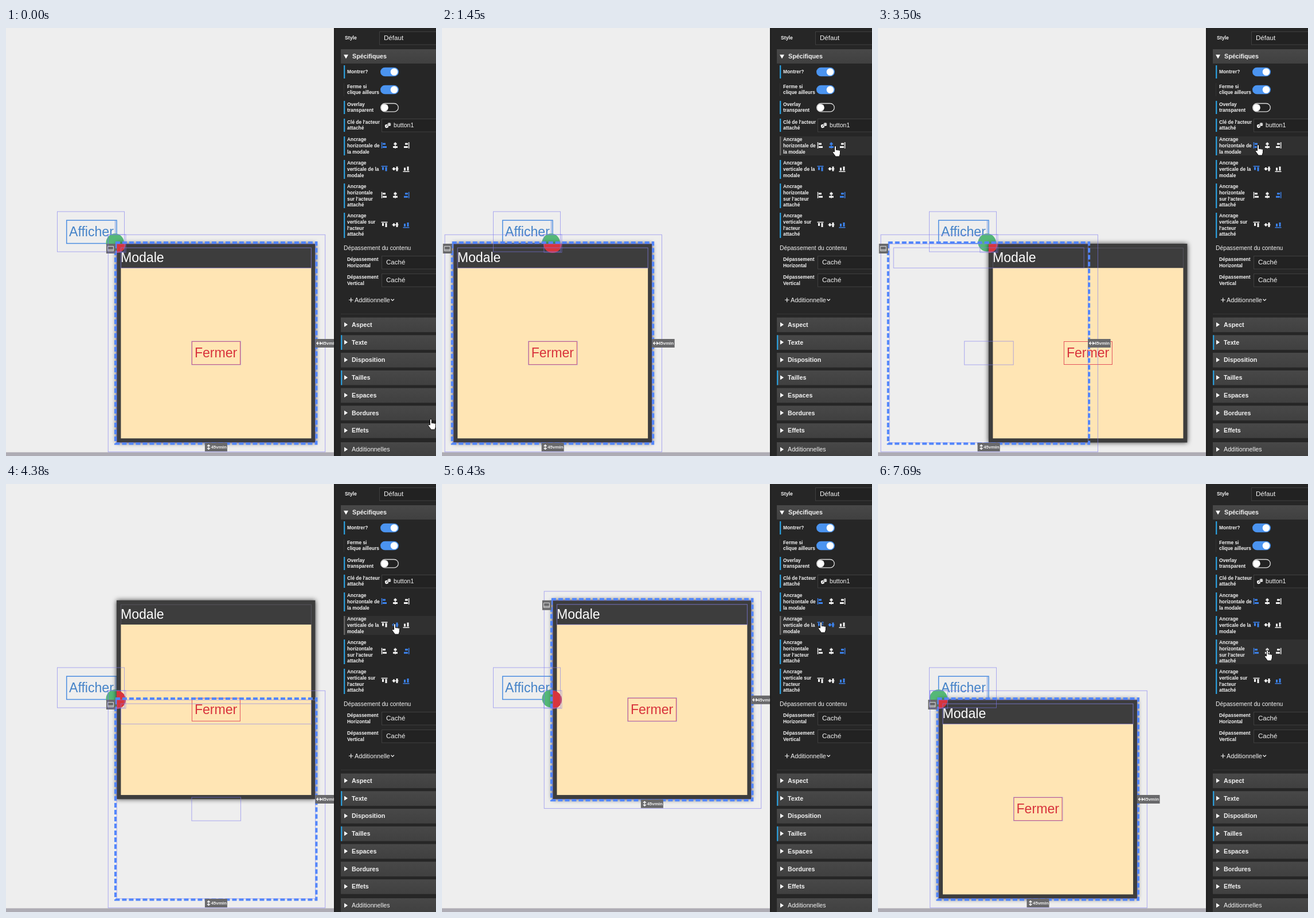
Write an HTML page that moves like this. It is 750 px wide and 746 px high and loops after 8 s.

```html
<!DOCTYPE html>
<html lang="fr">
<head>
<meta charset="utf-8">
<title>Ancrage de la modale</title>
<style>
  html, body { margin: 0; width: 100%; height: 100%; overflow: hidden; background: #eee; }
  svg { display: block; width: 100%; height: 100%; }
  text { font-family: "Liberation Sans", Arial, sans-serif; white-space: pre; }
  .thin { fill: none; stroke: #7c78ee; stroke-opacity: .6; }
  #box { filter: drop-shadow(0 0 4px rgba(0, 0, 0, .75)); }
</style>
</head>
<body>
<svg id="stage" viewBox="0 0 750 746">
  <defs>
    <linearGradient id="bar" x2="0" y2="1">
      <stop stop-color="#484848"/><stop offset="1" stop-color="#404040"/>
    </linearGradient>
    <clipPath id="inside"><rect id="insideRect" width="346.5" height="346.5"/></clipPath>
  </defs>
  <rect width="750" height="746" fill="#eee"/>
  <rect y="739.5" width="572" height="7" fill="#aeacb4"/>

  <rect x="105.7" y="335.2" width="87.3" height="40.3" fill="none" stroke="#4b8de0" stroke-width="1.5"/>
  <path d="M190.5 336V375" stroke="#7c9fe4"/>
  <text x="110" y="363" font-size="23.1" fill="#4583c8">Afficher</text>
  <circle id="green" cy="374" r="15.7" fill="#55b877"/>

  <g id="modal">
    <rect id="box" width="346.5" height="346.5" fill="#3d3d3d"/>
    <rect x="7.5" y="7.5" width="332" height="35" fill="none" stroke="#55545c"/>
    <rect x="7.5" y="42.3" width="332" height="297" fill="#ffe5b4"/>
    <text x="7" y="32" font-size="23.1" fill="#fff">Modale</text>
    <rect x="131.5" y="170.5" width="84" height="40" fill="none" stroke="#e4525b"/>
    <text x="136" y="198" font-size="23.1" fill="#d8333c">Fermer</text>
  </g>
  <g clip-path="url(#inside)"><circle id="red" cy="376" r="16" fill="#d7353d"/></g>

  <rect class="thin" x="89.5" y="320" width="117" height="70"/>
  <g id="overlay">
    <rect class="thin" x="-14.7" y="-15.7" width="378.5" height="378.5"/>
    <rect class="thin" x="7.5" y="7" width="332" height="35.3" stroke-opacity=".35"/>
    <rect class="thin" x="131" y="170" width="85.5" height="41"/>
    <rect class="thin" x=".3" y=".3" width="346.5" height="346.5"/>
    <rect x="-2" y="-2" width="350.5" height="350.5" fill="none" stroke="#5286fb" stroke-width="4" stroke-dasharray="8 4"/>
    <g fill="#69696b">
      <rect x="-18" y="0" width="16" height="17"/>
      <rect x="346.5" y="166" width="39.5" height="15"/>
      <rect x="154" y="347" width="39" height="15"/>
    </g>
    <path d="M-15.5 4.5h10v8h-10zM-15.5 10.5h10" fill="none" stroke="#ddd"/>
    <g fill="none" stroke="#fff" stroke-width="1.2">
      <path d="M349.5 173.500h7M351.500 171l-2.500 2.500l2.500 2.500M354.500 171l2.500 2.500l-2.500 2.500"/>
      <path d="M160.500 350.500v8M158 353l2.500-2.500l2.500 2.500M158 356l2.500 2.500l2.500-2.500"/>
    </g>
    <g font-size="8" font-weight="bold" fill="#eee">
      <text x="357" y="176.300">45vmin</text><text x="164.500" y="357.300">45vmin</text>
    </g>
  </g>
  <rect class="thin" id="pin" y="360" width="31" height="31"/>

  <g id="panel"></g>
  <path id="hand" fill="#fff" stroke="#111" stroke-linejoin="round"
    d="M3.500 11V2a1.500 1.500 0 0 1 3 0V8a1.200 1.200 0 0 1 2.400.300a1.200 1.200 0 0 1 2.400.500a1.100 1.100 0 0 1 2.200.700V14L12 19H5.500L.800 12.500a1.400 1.400 0 0 1 2.200-1.700Z"/>
</svg>
<script>
const LOOP = 8000, HALF = 173.25;
const BLUE = '#2b9cd8', ACTIVE = '#3c83ee';
const $ = id => document.getElementById(id);
const panel = $('panel');

function add(tag, attrs, content = '') {
  const el = document.createElementNS('http://www.w3.org/2000/svg', tag);
  for (const key in attrs) el.setAttribute(key, attrs[key]);
  el.textContent = content;
  panel.append(el);
  return el;
}
const rect = (x, y, width, height, fill, more) => add('rect', { x, y, width, height, fill, ...more });
const path = (d, more) => add('path', { d, ...more });
const label = (x, middle, size, content, bold) => add('text', {
  x, y: middle + size * .35, 'font-size': size, fill: '#f4f4f4', 'font-weight': bold ? 700 : 400
}, content);
const mark = (y, h, x = 589) => rect(x, y, 2.3, h, BLUE);

function field(x, y, value, textX, size = 11.6) {
  rect(x + .5, y + .5, 110, 22.500, '#222', { stroke: '#404040' });
  label(textX, y + 11.2, size, value);
}
function caption(lines, first) {
  lines.split('|').forEach((line, i) => label(595, first + i * 10.6, 8.4, line, true));
}
function section(y, h, name, open, bold = true) {
  rect(584, y, 166, h, 'url(#bar)');
  const m = y + 12.5;
  path(open ? `M589 ${m - 3}h8l-4 7z` : `M590 ${m - 4}v8l6-4z`, { fill: '#fff' });
  label(open ? 604 : 603, m, 10.7, name, bold);
}
function toggle(y, on) {
  rect(653.7, y - 7.2, 30.6, 14.4, on ? '#4b94f0' : '#222', { rx: 7.2, stroke: on ? '#4b94f0' : '#ddd', 'stroke-width': 1.3 });
  add('circle', { cx: on ? 677 : 660.5, cy: y, r: 6.3, fill: '#fff' });
}
// Alignment glyph: a guide line with two blocks; side 0, 1, 2 = start, middle, end.
function alignIcon(x, y, side, vertical) {
  const guide = [-5.2, -.7, 4][side];
  const blocks = [[-3, -3], [-2.5, -4], [-2, -4]][side];
  const d = `M${guide} -5.5h1.400v11h-1.400z`
    + `M${blocks[0]} -4h5v3h-5zM${blocks[1]} 1.500h${side === 1 ? 8 : 7}v3h-${side === 1 ? 8 : 7}z`;
  return path(d, { transform: `translate(${x} ${y})` + (vertical ? ' matrix(0 1 1 0 0 0)' : '') });
}

rect(572, 0, 178, 746, '#262626');
rect(572, 0, 2, 746, '#1d1d1d');
label(591, 17, 8.7, 'Style', true);
field(651, 6, 'Défaut', 659);
section(37, 25, 'Spécifiques', true);

mark(65, 23); caption('Montrer?', 76); toggle(76.5, true);
rect(589, 96, 1, 23, '#333'); caption('Ferme si|clique ailleurs', 101.7); toggle(107.5, true);
mark(127, 23); caption('Overlay|transparent', 132.7); toggle(138.7, false);
mark(158, 23); caption("Clé de l'acteur|attaché", 163.7);
field(655, 158, 'button1', 676, 10.6);
rect(661, 168, 6, 6, '#eee', { rx: 2, transform: 'rotate(-12 664 171)' });
rect(665.5, 165, 6, 6, '#eee', { rx: 2, stroke: '#222', 'stroke-width': .7 });
path('M667 167.500h1M669.500 167.500h1M663 171h2', { stroke: '#222' });

const rows = [
  { top: 189, h: 33, mid: 204.5, text: 'Ancrage|horizontale de|la modale' },
  { top: 230, h: 33, mid: 245.5, text: 'Ancrage|verticale de la|modale', vertical: true },
  { top: 271, h: 43, mid: 291.3, text: "Ancrage|horizontale|sur l'acteur|attaché" },
  { top: 322, h: 44, mid: 343, text: "Ancrage|verticale sur|l'acteur|attaché", vertical: true }
];
for (const row of rows) {
  row.hover = rect(589, row.top, 161, row.h, '#303030');
  row.mark = mark(row.top, row.h);
  caption(row.text, row.top + 5.5);
  row.icons = [0, 1, 2].map(i => alignIcon(660 + 19 * i, row.mid, i, row.vertical));
}

label(589, 383, 10.3, 'Dépassement du contenu');
caption('Dépassement|Horizontal', 403); field(655, 397, 'Caché', 663);
caption('Dépassement|Vertical', 434); field(655, 428, 'Caché', 663);
path('M598 474h7.500M601.700 470.200v7.500M671.500 472.500l2.700 2.700l2.700-2.700', { fill: 'none', stroke: '#f4f4f4', 'stroke-width': 1.2 });
label(608, 474, 10.8, 'Additionnelle');
rect(584, 498, 166, 1, '#383838');
['Aspect', 'Texte', 'Disposition', 'Tailles', 'Espaces', 'Bordures', 'Effets']
  .forEach((name, i) => section(504.6 + i * 30.75, 25.6, name));
section(722, 25, 'Additionnelles', false, false);
mark(535.3, 25.6, 584);
mark(596.8, 25.6, 584);

// Each choice: press, modal jump, outline catch-up (ms), then row and option.
const choices = [
  [1070, 1130, 1190, 0, 1], [1940, 2000, 2070, 0, 2], [2880, 2940, 3010, 0, 1],
  [3430, 3500, 3570, 0, 0], [4250, 4320, 4390, 1, 1], [5000, 5080, 5130, 1, 2],
  [5860, 5930, 6000, 1, 1], [6430, 6550, 6620, 1, 0], [7500, 7560, 7630, 2, 0]
];
const trail = [
  [70, 736, 681], [380, 712, 420], [610, 658, 235], [710, 668, 197], [800, 676, 204],
  [1400, 676, 204], [1450, 681, 205], [1790, 692, 204], [2460, 692, 204], [2760, 676, 204],
  [3270, 676, 204], [3430, 658, 203], [3640, 658, 203], [4040, 675, 242], [4110, 673, 243],
  [4580, 673, 243], [5000, 690, 241], [5130, 690, 241], [5390, 673, 241], [6240, 673, 241],
  [6430, 656, 240], [6690, 656, 240], [7080, 656, 288], [7150, 655, 288], [7350, 654, 288],
  [7630, 654, 288], [7690, 674, 289], [8000, 674, 289]
];

function pointerAt(t) {
  const i = trail.findIndex(p => p[0] > t);
  if (i < 1) return trail[i ? trail.length - 1 : 0].slice(1);
  const [a, b] = [trail[i - 1], trail[i]], k = (t - a[0]) / (b[0] - a[0]);
  return [1, 2].map(n => a[n] + (b[n] - a[n]) * k);
}
function optionsAt(t, phase) {
  const options = [0, 0, 2, 2];
  for (const c of choices) if (c[phase] <= t) options[c[3]] = c[4];
  return options;
}
function place([h, v, anchor]) {
  const ax = 105.5 + anchor * 43.7;
  return { ax, x: ax - h * HALF, y: 376 - v * HALF };
}
const move = (el, x, y) => el.setAttribute('transform', `translate(${x} ${y})`);

function render(t) {
  const [px, py] = pointerAt(t);
  const pressed = optionsAt(t, 0), options = optionsAt(t, 1);
  const modal = place(options), outline = place(optionsAt(t, 2));
  move($('modal'), modal.x, modal.y);
  move($('insideRect'), modal.x, modal.y);
  move($('overlay'), outline.x, outline.y);
  move($('hand'), px, py);
  $('green').setAttribute('cx', modal.ax - (options[2] ? 2.7 : 0));
  $('red').setAttribute('cx', modal.ax);
  $('pin').setAttribute('x', outline.ax - 15);
  rows.forEach((row, r) => {
    const over = py >= row.top && py <= row.top + row.h;
    row.hover.setAttribute('visibility', over ? 'visible' : 'hidden');
    row.mark.setAttribute('fill', options[r] === 1 ? '#666' : BLUE);
    row.icons.forEach((icon, i) =>
      icon.setAttribute('fill', i === options[r] || i === pressed[r] ? ACTIVE : '#f4f4f4'));
  });
}

const start = performance.now();
(function tick() {
  render((performance.now() - start) % LOOP);
  requestAnimationFrame(tick);
})();
</script>
</body>
</html>
```
